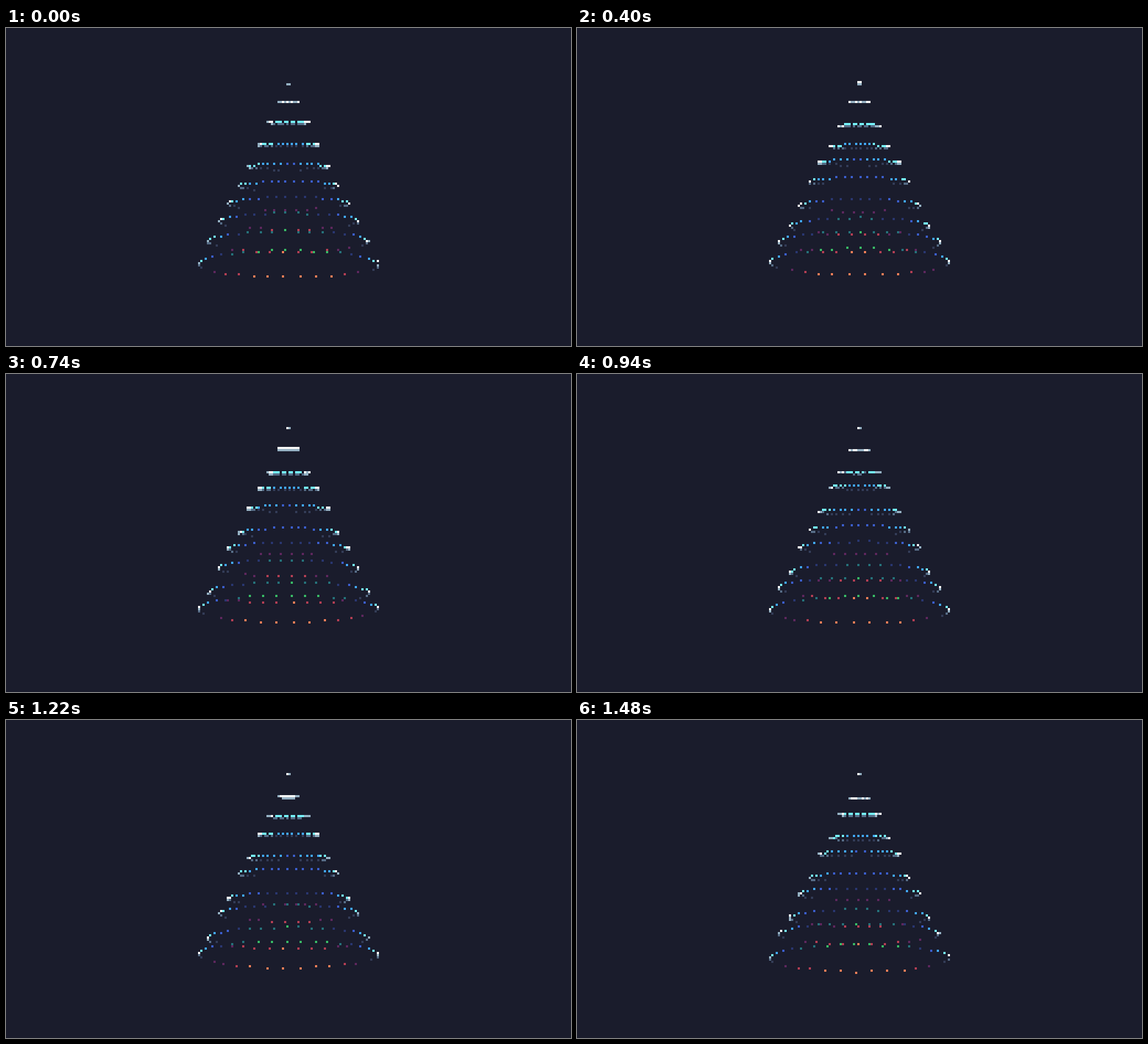
Recreate the animation shown at these times as an HTML page with a canvas. Size 768 by 432 pixels, loop 1500 ms.

```html
<!DOCTYPE html>
<html lang="en">
<head>
<meta charset="utf-8">
<title>Dotted cone</title>
<style>
  html, body { margin: 0; width: 100%; height: 100%; overflow: hidden; background: #1a1c2c; }
  canvas { display: block; }
</style>
</head>
<body>
<canvas id="stage" width="768" height="432"></canvas>
<script>
const ctx = document.getElementById('stage').getContext('2d');
const TAU = Math.PI * 2;
const CELL = 3, STEP = 20, LOOP = 1500;
const RINGS = 10, DOTS = 37, DOT_ANGLE = 1.1881;
const DEPTH = 590, CENTER = 128, HORIZON = 19.5;
const PALETTE = [
  '#1a1c2c', '#5d275d', '#b13e53', '#ef7d57', '#ffcd75', '#a7f070', '#38b764', '#257179',
  '#29366f', '#3b5dc9', '#41a6f6', '#73eff7', '#f4f4f4', '#94b0c2', '#566c86', '#333c57'
];

function dot(x, y, color) {
  ctx.fillStyle = PALETTE[color & 15];
  ctx.fillRect(Math.floor(x) * CELL, Math.floor(y) * CELL, CELL, CELL);
}

// Each ring bobs at a rate that grows with its index.
function ringHeight(k, tick) {
  const phase = -0.673 + 0.1577 * k + (k + 0.06) * tick * 0.0047;
  return 25.6203 + 8.985 * k + 1.25 * Math.cos(TAU * phase);
}

function draw(tick) {
  ctx.fillStyle = PALETTE[0];
  ctx.fillRect(0, 0, 768, 432);
  const spin = 3.1346 + tick * 0.01129;
  for (let k = 0; k < RINGS; k++) {
    const radius = 4.5 * (k + 0.06);
    const height = ringHeight(k, tick) - HORIZON;
    // Dots go round the ring seven times, so near and far ones interleave.
    for (let i = DOTS - 1; i >= 0; i--) {
      const a = spin - i * DOT_ANGLE;
      const z = radius * Math.sin(a);
      const zoom = DEPTH / (DEPTH - z);
      dot(CENTER + radius * Math.cos(a) * zoom, HORIZON + height * zoom, Math.floor(13 + z / 6));
    }
  }
}

let last = -1;
function frame() {
  const tick = Math.floor(performance.now() % LOOP / STEP);
  if (tick !== last) draw(last = tick);
  requestAnimationFrame(frame);
}
frame();
</script>
</body>
</html>
```
